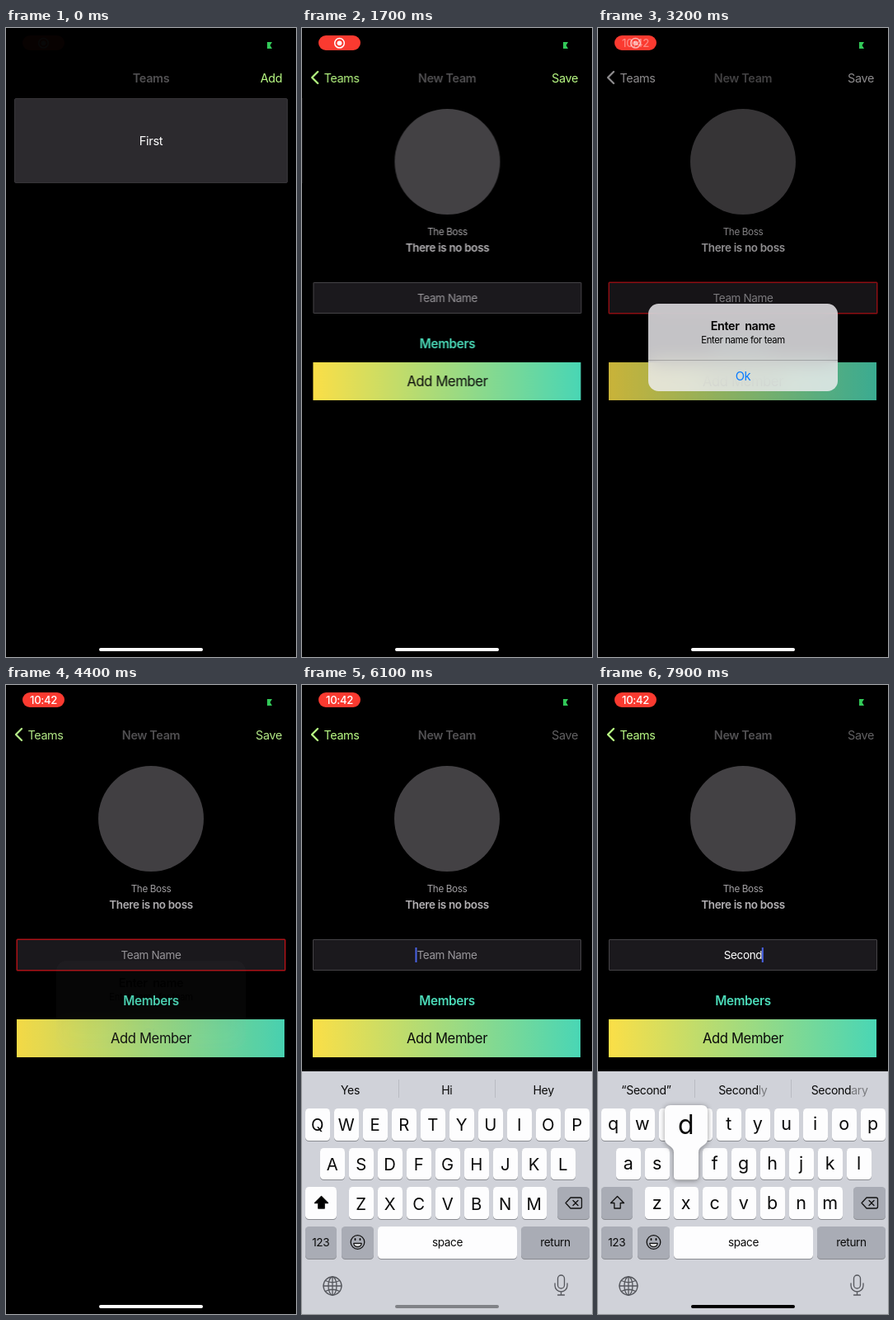
Recreate the animation shown at these times as an HTML page. Size 352 by 762 pixels, loop 8 s.

```html
<!DOCTYPE html>
<html lang="en">
<head>
<meta charset="utf-8">
<title>New team</title>
<style>
html, body { margin: 0; width: 100%; height: 100%; overflow: hidden; background: #000; }
#stage {
  position: relative; width: 352px; height: 762px; overflow: hidden; background: #000;
  font: 400 14.4px Inter, "Noto Sans", sans-serif; letter-spacing: -.025em; color: #fff;
}
#stage * { box-sizing: border-box; }
#stage div, #stage svg, .t { position: absolute; }
.t { translate: -50% -50%; white-space: pre; line-height: normal; }
.semi { font-weight: 600; }
svg { overflow: visible; fill: none; stroke-linecap: round; stroke-linejoin: round; }
.page { inset: 0; background: #000; }
#list, #listTitle, #add, #form, #back, #formTitle, #saveBox, #pill, #pillIcon, #pillTime,
#dim, #alert, #field, #save, #keyboard, #home, .upper, .lower, .blink {
  animation: 8s linear infinite;
}

/* navigation */
#list { animation-name: leave; --dx: -106px; --o: 1; }
#listTitle { animation-name: leave; --dx: -128px; color: #525153; }
#add { animation-name: leave; --dx: 0px; color: #b9fa84; }
#form { animation-name: enter; --dx: 352px; --o: 1; }
#formTitle { animation-name: enter; --dx: 128px; color: #525153; }
#back { animation-name: enter, tint; --dx: 128px; inset: 0; color: #b9fa84; }
#saveBox { animation-name: enter; --dx: 0px; inset: 0; }
#save { animation-name: save; }
@keyframes enter {
  0%, 15.6% { transform: translateX(var(--dx)); opacity: var(--o, 0); animation-timing-function: cubic-bezier(.2,.8,.2,1); }
  21.9%, 100% { transform: none; opacity: 1; }
}
@keyframes leave {
  0%, 15.6% { transform: none; opacity: 1; animation-timing-function: cubic-bezier(.2,.8,.2,1); }
  21.9%, 100% { transform: translateX(var(--dx)); opacity: var(--o, 0); }
}
@keyframes tint {
  0%, 34%, 55.5%, 100% { color: #b9fa84; }
  38%, 52% { color: #b0aeb0; }
}
@keyframes save {
  0%, 32.2%, 55.5%, 59.8% { color: #b9fa84; }
  32.6%, 33.4% { color: #4a6435; }
  34.4% { color: #b9fa84; }
  38%, 52% { color: #b0aeb0; }
  60.6%, 100% { color: #626163; }
}

/* content */
#card { left: 10px; top: 85px; width: 332px; height: 103px; background: #2c2a2e; border: 1px solid #363438; border-radius: 2px; }
#photo { left: 112px; top: 98px; width: 128px; height: 128px; border-radius: 50%; background: #434144; }
#field { left: 13px; top: 308px; width: 326px; height: 38px; background: #1b191d; border: 1px solid #454347; border-radius: 1px; animation-name: field; }
#addMember { left: 13px; top: 405px; width: 325px; height: 46px; background: linear-gradient(90deg, #fbdf47, #49d6b5); }
.entry { left: 176px; top: 327px; font-size: 13.5px; }
.cursor { position: absolute; top: -1px; width: 2px; height: 18px; background: #4a63e6; right: -2px; }
.blink { left: -2px; right: auto; animation-name: blink; }
@keyframes field {
  0%, 33.5%, 60.6%, 100% { border-color: #454347; box-shadow: none; }
  35%, 59.8% { border-color: #b01218; box-shadow: 0 0 0 .5px #b01218; }
}
@keyframes blink {
  0%, 60.7%, 70%, 73.8% { opacity: 0; }
  60.8%, 68%, 75.8%, 100% { opacity: 1; }
}

/* status bar */
#pill { left: 20px; top: 8.5px; width: 51px; height: 18.5px; border-radius: 10px; background: #fb3a30; animation-name: pill; }
#pillIcon { animation-name: pillIcon; }
#pillTime { font-size: 13.2px; font-weight: 500; animation-name: pillTime; }
#battery { left: 317px; top: 17px; width: 6px; height: 8px; background: #32c858; clip-path: polygon(0 0, 100% 0, 60% 50%, 100% 100%, 0 100%); }
@keyframes pill { 0% { opacity: .03; } 6.25%, 59%, 66.5%, 100% { opacity: 1; } 62.5% { opacity: .86; } }
@keyframes pillIcon { 0%, 37.5% { opacity: 1; } 43.75%, 100% { opacity: 0; } }
@keyframes pillTime { 0%, 37.5% { opacity: 0; } 43.75%, 100% { opacity: 1; } }

/* alert */
#dim { inset: 0; background: #000; animation-name: dim; }
#alert {
  left: 61px; top: 334px; width: 230px; height: 106px; border-radius: 12.5px; color: #000;
  background: #f0eef2d1; backdrop-filter: blur(12px); animation-name: alert;
}
#alert hr { position: absolute; left: 0; top: 68px; width: 100%; margin: 0; border: 0; border-top: 1px solid #3c3c434d; }
@keyframes dim { 0%, 34%, 55.5%, 100% { opacity: 0; } 38%, 52% { opacity: .2; } }
@keyframes alert {
  0%, 34% { opacity: 0; transform: scale(1.18); animation-timing-function: ease-out; }
  38%, 52% { opacity: 1; transform: none; animation-timing-function: ease-out; }
  55.5%, 100% { opacity: 0; transform: none; }
}

/* keyboard */
#keyboard { left: 0; top: 468px; width: 352px; height: 294px; background: #d0d2d9; color: #0a0a0a; animation-name: keyboard; }
.key { height: 38.5px; border-radius: 4.5px; background: #fdfdfe; box-shadow: 0 1px 0 #8a8c91; }
.key .t { left: 50%; top: 50%; }
.dark { background: #a9acb5; }
.char { font-size: 20.3px; }
.lower.char { font-size: 21.5px; margin-top: -1px; }
.small { font-size: 13.6px; }
.divider { top: 10px; width: 1px; height: 22px; background: #b9bbc2; }
.hint { top: 21.5px; font-size: 14.1px; }
.upper { animation-name: upper; animation-timing-function: step-end; }
.lower { animation-name: lower; animation-timing-function: step-end; }
.popup { filter: drop-shadow(0 1px 3px #0006); }
#home { left: 113px; top: 750.5px; width: 126px; height: 4.5px; border-radius: 3px; animation-name: home; }
@keyframes keyboard {
  0%, 60.7% { transform: translateY(294px); animation-timing-function: cubic-bezier(.17,.59,.4,1); }
  66.5%, 100% { transform: none; }
}
@keyframes upper { 0% { visibility: visible; } 81.8%, 100% { visibility: hidden; } }
@keyframes lower { 0% { visibility: hidden; } 81.8%, 100% { visibility: visible; } }
@keyframes home { 0%, 60.6% { background: #fff; } 64%, 77.5% { background: #808287; } 82%, 100% { background: #000; } }
</style>
</head>
<body>
<div id="stage">
  <div class="page" id="list">
    <div id="card"></div>
    <span class="t" style="left:176px;top:136.5px;font-size:14.6px">First</span>
  </div>

  <div class="page" id="form">
    <div id="photo"></div>
    <span class="t" style="left:176px;top:247px;font-size:11.7px;color:#a3a1a4">The Boss</span>
    <span class="t semi" style="left:176px;top:266px;font-size:13.5px;color:#b3b1b4">There is no boss</span>
    <div id="field"></div>
    <span class="t semi" style="left:176px;top:382px;font-size:15.3px;color:#4bdab8">Members</span>
    <div id="addMember"></div>
    <span class="t" style="left:176px;top:428px;font-size:16.6px;color:#0a0a0a">Add Member</span>
  </div>

  <span class="t semi" id="listTitle" style="left:176px;top:59.5px">Teams</span>
  <span class="t" id="add" style="left:322px;top:59.5px">Add</span>
  <div id="back">
    <svg width="352" height="90" stroke="currentColor" stroke-width="2.3"><path d="M19 53l-7 7 7 7"/></svg>
    <span class="t" style="left:48px;top:59.5px">Teams</span>
  </div>
  <span class="t semi" id="formTitle" style="left:176px;top:59.5px">New Team</span>
  <div id="saveBox"><span class="t" id="save" style="left:319px;top:59.5px">Save</span></div>

  <div id="dim"></div>
  <div id="alert">
    <span class="t semi" style="left:115px;top:25.5px">Enter  name</span>
    <span class="t" style="left:115px;top:44px;font-size:11.3px">Enter name for team</span>
    <hr>
    <span class="t" style="left:115px;top:87.5px;font-size:14.8px;color:#0a7cff">Ok</span>
  </div>

  <div id="pill">
    <svg id="pillIcon" width="51" height="19" stroke="#fff" stroke-width="1.5">
      <circle cx="25.5" cy="9.3" r="5.8"/><circle cx="25.5" cy="9.3" r="2.9" fill="#fff" stroke="none"/>
    </svg>
    <span class="t" id="pillTime" style="left:25.5px;top:9.3px">10:42</span>
  </div>
  <div id="battery"></div>

  <div id="keyboard">
    <div class="divider" style="left:116.5px"></div>
    <div class="divider" style="left:234px"></div>
    <svg width="352" height="294" stroke="#55575d" stroke-width="1.3">
      <g transform="translate(37 260)">
        <circle r="11"/><ellipse rx="5" ry="11"/><path d="M0-11V11M-11 0H11M-8.5-6.5Q0-2 8.5-6.5M-8.5 6.5Q0 2 8.5 6.5"/>
      </g>
      <g transform="translate(314.5 259)">
        <rect x="-4" y="-12" width="8" height="16" rx="4"/><path d="M-7.5-2v2.5a7.5 7.5 0 0 0 15 0V-2M0 8v4M-4 12h8"/>
      </g>
    </svg>
  </div>
  <div id="home"></div>
</div>

<script>
const LOOP = 8000, KEYBOARD_UP = 4840;
const $ = id => document.getElementById(id);
const keyboard = $('keyboard');

const add = (parent, tag, className, html = '', style = '') => {
  const el = document.createElement(tag);
  el.className = className;
  el.innerHTML = html;
  el.style.cssText = style;
  parent.append(el);
  return el;
};
const loop = (el, frames) => el.animate(frames, { duration: LOOP, iterations: Infinity });
const show = (el, from, to) => loop(el, [0, from, to, LOOP].map((t, i) => ({
  visibility: i === 1 || (i === 3 && to === LOOP) ? 'visible' : 'hidden',
  offset: t / LOOP, easing: 'step-end'
})));
const fadeIn = (el, from, to) => loop(el, [[0, 0], [from, 0], [to, 1], [LOOP, 1]].map(([t, opacity]) =>
  ({ opacity, offset: t / LOOP })));

// Keys
const places = {};
const rowTop = row => 45 + row * 47.7;
const key = (x, row, width, html, dark = '') =>
  add(keyboard, 'div', 'key ' + dark, html, `left:${x}px;top:${rowTop(row)}px;width:${width}px`);
const icon = body => `<svg width="39" height="38.5" stroke="#111" stroke-width="1.3">${body}</svg>`;

['QWERTYUIOP', 'ASDFGHJKL', 'ZXCVBNM'].forEach((letters, row) => {
  [...letters].forEach((letter, i) => {
    const x = [3.5, 21.5, 56.5][row] + i * 35, low = letter.toLowerCase();
    places[low] = [x, rowTop(row)];
    key(x, row, 30, `<span class="t char upper">${letter}</span><span class="t char lower">${low}</span>`);
  });
});
const arrow = fill => icon(`<path fill="${fill}" d="M19.5 11.5l-8 8h4.3v6.5h7.4v-6.5h4.3z"/>`);
key(3.5, 2, 38.5, arrow('#000')).classList.add('upper');
key(3.5, 2, 38.5, arrow('none'), 'dark').classList.add('lower');
key(310, 2, 39, icon('<path d="M10 19.5l6-6.5h11.5q2 0 2 2v9q0 2-2 2H16zM19 16.5l6 6m0-6l-6 6"/>'), 'dark');
key(3.5, 3, 38.5, '<span class="t small">123</span>', 'dark');
key(48, 3, 39, icon('<circle cx="19.5" cy="19" r="8.3"/><path fill="#ddd" d="M14.8 20.3h9.4a4.7 4.4 0 0 1-9.4 0z"/><path d="M16.5 15v1.2m6-1.2v1.2" stroke-width="1.8"/>'), 'dark');
key(92, 3, 169, '<span class="t small">space</span>');
key(266, 3, 83, '<span class="t small">return</span>', 'dark');

// Typing: time, text so far, the three suggestions
const steps = [
  [KEYBOARD_UP, '', 'Yes', 'Hi', 'Hey'],
  [6450, 'S', '“S”', 'So', 'She'],
  [6750, 'Se', '“Se”', 'See', 'Send'],
  [7000, 'Sec', '“Sec”', 'Second', 'Section'],
  [7250, 'Seco', '“Seco”', 'Second', 'Seconds'],
  [7550, 'Secon', '“Secon”', 'Second', 'Seconds'],
  [7840, 'Second', '“Second”', 'Secondly', 'Secondary']
];
const bubble = 'M-4-52h38q7 0 7 7v34c0 8-11 8-11 16v29q0 4.5-4.5 4.5h-21q-4.5 0-4.5-4.5v-29c0-8-11-8-11-16v-34q0-7 7-7z';

steps.forEach(([time, typed, ...words], i) => {
  const end = i + 1 < steps.length ? steps[i + 1][0] : LOOP;
  const entry = add($('form'), 'span', 't entry',
    (typed || 'Team Name') + `<i class="cursor ${typed ? '' : 'blink'}"></i>`, typed ? '' : 'color:#98969a');
  show(entry, typed ? time : 0, end);

  words.forEach((word, slot) => {
    const hint = add(keyboard, 'span', 't hint', '', `left:${58.5 + slot * 117.3}px`);
    const known = word[0] === '“' ? word.length : typed.length;
    hint.append(word.slice(0, known));
    [...word.slice(known)].forEach((letter, n) => {
      const start = time + (typed ? 0 : n / word.length * 220);
      fadeIn(add(hint, 'span', '', letter), start, start + 140);
    });
    show(hint, time, end);
  });

  if (!typed) return;
  const letter = typed.at(-1), [x, y] = places[letter.toLowerCase()];
  const popup = add(keyboard, 'div', 'popup',
    `<svg width="1" height="1"><path d="${bubble}" fill="#fdfdfe"/></svg>` +
    `<span class="t" style="left:15px;top:-29px;font-size:32px">${letter}</span>`,
    `left:${x}px;top:${y}px`);
  show(popup, time - 60, Math.min(time + 110, LOOP));
});
</script>
</body>
</html>
```
